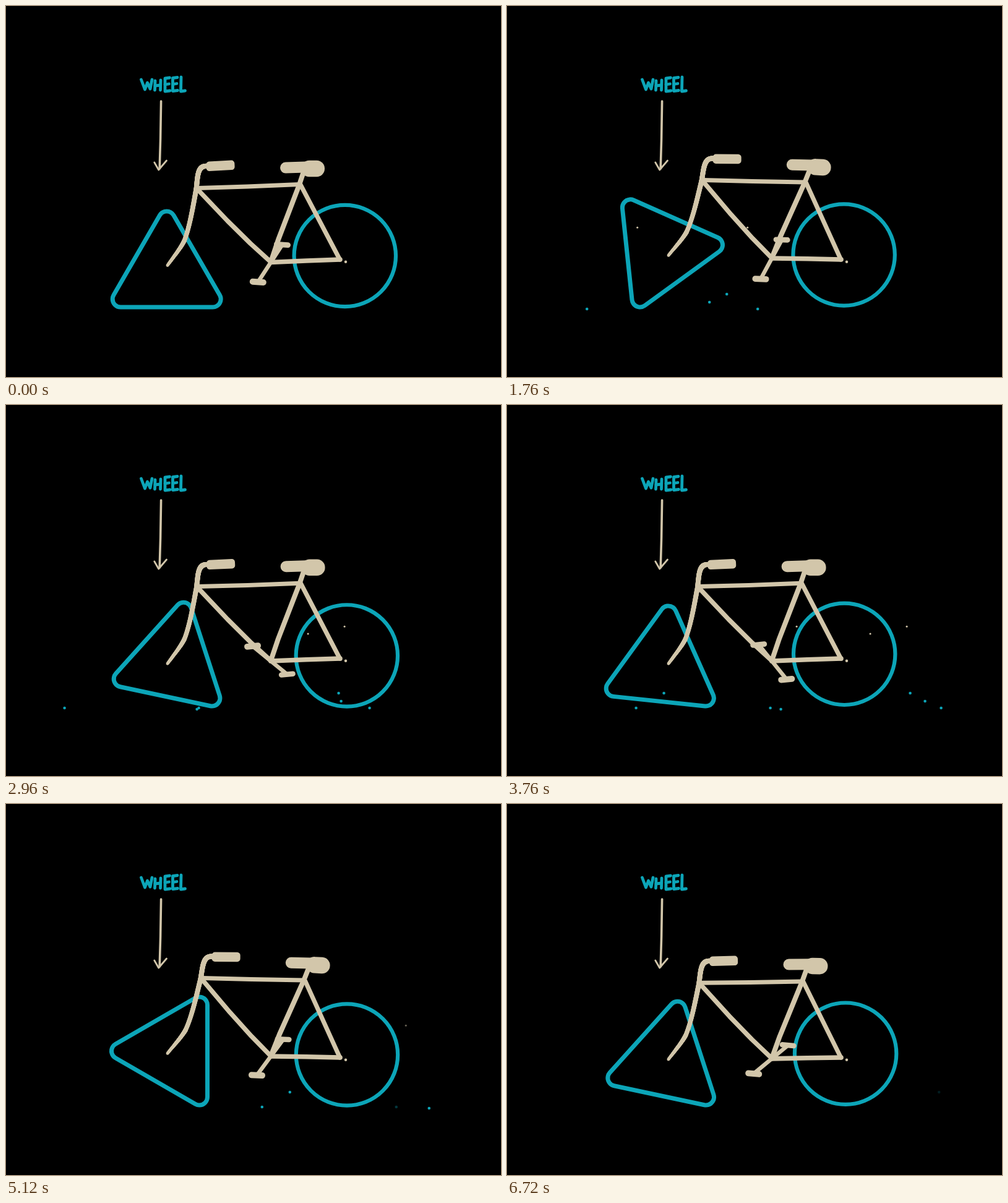
Recreate the animation shown at these times as an HTML page with a canvas. Size 800 px wide and 600 px high, loop 6800 ms.

```html
<!DOCTYPE html>
<html lang="en">
<head>
<meta charset="utf-8">
<title>Wheel</title>
<style>
html, body { margin: 0; width: 100%; height: 100%; overflow: hidden; background: #000; }
canvas { display: block; }
</style>
</head>
<body>
<canvas id="stage" width="800" height="600" role="img" aria-label="WHEEL: a bicycle with a triangular front wheel"></canvas>
<script>
const ctx = document.getElementById('stage').getContext('2d');
const TAN = '#d2c6aa', BLUE = '#0ca5b8';
const LOOP = 6800, STEP = 80, TAU = Math.PI * 2, DEG = Math.PI / 180;
const SPECK_LIFE = 98, SPECK_FADE = 6;

function stroke(color, width) {
  ctx.strokeStyle = color;
  ctx.lineWidth = width;
  ctx.stroke();
}

function line(points, width, color = TAN) {
  ctx.beginPath();
  points.forEach(([x, y]) => ctx.lineTo(x, y));
  stroke(color, width);
}

function dot(x, y, r, color) {
  ctx.beginPath();
  ctx.arc(x, y, r, 0, TAU);
  ctx.fillStyle = color;
  ctx.fill();
}

// Cubic stroke whose width runs from w0 to w1
function taper(a, b, c, d, w0, w1) {
  for (let i = 0; i <= 80; i++) {
    const t = i / 80, u = 1 - t;
    const at = k => u * u * u * a[k] + 3 * u * u * t * b[k] + 3 * u * t * t * c[k] + t * t * t * d[k];
    dot(at(0), at(1), (w0 + (w1 - w0) * t) / 2, TAN);
  }
}

// Rounded bar around its centre
function bar(x, y, w, h, r, angle) {
  ctx.save();
  ctx.translate(x, y);
  ctx.rotate(angle);
  ctx.beginPath();
  ctx.roundRect(-w / 2, -h / 2, w, h, r);
  ctx.fillStyle = TAN;
  ctx.fill();
  ctx.restore();
}

function label() {
  const pen = (...points) => line(points, 4.8, BLUE);
  const letterE = (x, y) => {
    pen([x + 7.5, y], [x, y + 1], [x, y + 22], [x + 8, y + 21]);
    pen([x, y + 11], [x + 6.5, y + 10]);
  };
  pen([218.5, 119], [224.5, 135], [228.5, 124], [233, 134], [236, 119]);
  pen([241, 121], [240.5, 136]);
  pen([250, 120], [249.5, 136]);
  pen([241, 129], [249.5, 128]);
  letterE(257, 116);
  letterE(269.5, 115.5);
  pen([283, 115], [282.5, 138], [289.5, 137]);
}

function arrow() {
  line([[250.6, 154], [249.6, 215], [248.2, 263]], 3.6);
  line([[239.8, 253], [246.7, 265], [259.5, 250]], 2.8);
}

// Each [x, tick] is a speck's place at the loop start and its moment of birth
function drift(tick, y, speed, color, ...births) {
  for (const [x, born] of births) {
    const age = tick - born;
    const alpha = Math.min(1, age / SPECK_FADE, (SPECK_LIFE - age) / SPECK_FADE);
    if (alpha <= 0) continue;
    ctx.globalAlpha = alpha;
    dot(x + speed * tick, y, color === BLUE ? 2.3 : 1.5, color);
  }
  ctx.globalAlpha = 1;
}

function specks(tick) {
  drift(tick, 358.3, 4.95, TAN, [161, 16], [-17, 39]);
  drift(tick, 370, 4.95, TAN, [102, 12]);
  drift(tick, 466, 5.7, BLUE, [93, 12], [-305, 79]);
  drift(tick, 490, 5.7, BLUE, [143, 8], [-133, 38], [-350, 68]);
  drift(tick, 479, 6.7, BLUE, [19, 6]);
  drift(tick, 492, 6.7, BLUE, [-214, 46]);
}

function triangle(drawing) {
  const R = 86;
  const corners = [0, 1, 2].map(i => (120 * i - 90 - 12 * drawing) * DEG);
  const cx = 259.7 + 9.8 * Math.sin(drawing * TAU / 30);
  const cy = 474 - R * Math.max(...corners.map(Math.sin));
  ctx.beginPath();
  for (const a of corners) {
    ctx.arc(cx + R * Math.cos(a), cy + R * Math.sin(a), 13, a - TAU / 6, a + TAU / 6);
  }
  ctx.closePath();
  stroke(BLUE, 7);
}

function roundWheel(drawing) {
  const sway = Math.sin(drawing * TAU / 30);
  ctx.beginPath();
  ctx.arc(547.8 + 3.2 * sway, 404 + 1.5 * sway, 82.2, 0, TAU);
  stroke(BLUE, 6.2);
}

function cranks(drawing, n) {
  const a = (57 + 16 * drawing) * DEG;
  const tilt = (5 * Math.cos(n * TAU / 85) - 1) * DEG;
  const along = r => [428 + r * Math.cos(a), 414.5 - r * Math.sin(a)];
  line([along(32), along(-34)], 6.5);
  bar(...along(34), 27, 8.6, 4.2, tilt);
  bar(...along(-38), 27, 9.8, 4.6, tilt);
}

// Lift of the fork as the triangle rolls over a corner, 0 to 1
function lift(tick) {
  const p = tick / 20 % 1, x = 1 - Math.abs(1 - 2 * p);
  return x < 0.5 ? 0.5 * (2 * x) ** 2.5 : 1 - 0.5 * (2 - 2 * x) ** 2.5;
}

function bike(tick, drawing, n) {
  ctx.save();
  ctx.translate(540, 411);
  ctx.rotate(4.65 * DEG * lift(tick));
  ctx.translate(-540, -411);
  // Handlebar and fork
  taper([326, 259], [309, 257], [310, 275], [307.5, 296], 8, 8);
  taper([307.5, 296], [302, 325], [297, 357], [288, 380], 8, 7);
  taper([288, 380], [282, 392], [272, 404], [261, 419.5], 7, 4.8);
  bar(346.5, 258.3, 46, 15.5, 5, -3 * DEG);
  // Tubes
  line([[310, 294.5], [390, 292], [474, 288.5]], 7);
  line([[310, 297], [358, 347.5], [395, 384], [428, 414]], 7.5);
  line([[480, 271], [474, 289], [440, 378], [428, 414]], 8);
  line([[476, 289], [539.5, 410]], 7.2);
  line([[428, 414.5], [485, 412], [540, 410]], 7.6);
  // Saddle
  bar(468, 261, 50, 18, 9, -2 * DEG);
  bar(496, 263, 38, 26.5, 13, 0);
  cranks(drawing, n);
  ctx.restore();
  dot(549, 413.7, 2.2, TAN);
}

function render(n) {
  const tick = Math.floor(2.09 * n + 0.7);
  const drawing = Math.max(0, Math.floor(2.121 * n - 0.1)) / 2;
  ctx.fillStyle = '#000';
  ctx.fillRect(0, 0, 800, 600);
  ctx.lineCap = ctx.lineJoin = 'round';
  label();
  arrow();
  specks(tick);
  triangle(drawing);
  roundWheel(drawing);
  bike(tick, drawing, n);
}

const start = performance.now();
function loop() {
  const t = (performance.now() - start) % LOOP;
  render(Math.floor(t / STEP));
  requestAnimationFrame(loop);
}
loop();
</script>
</body>
</html>
```
